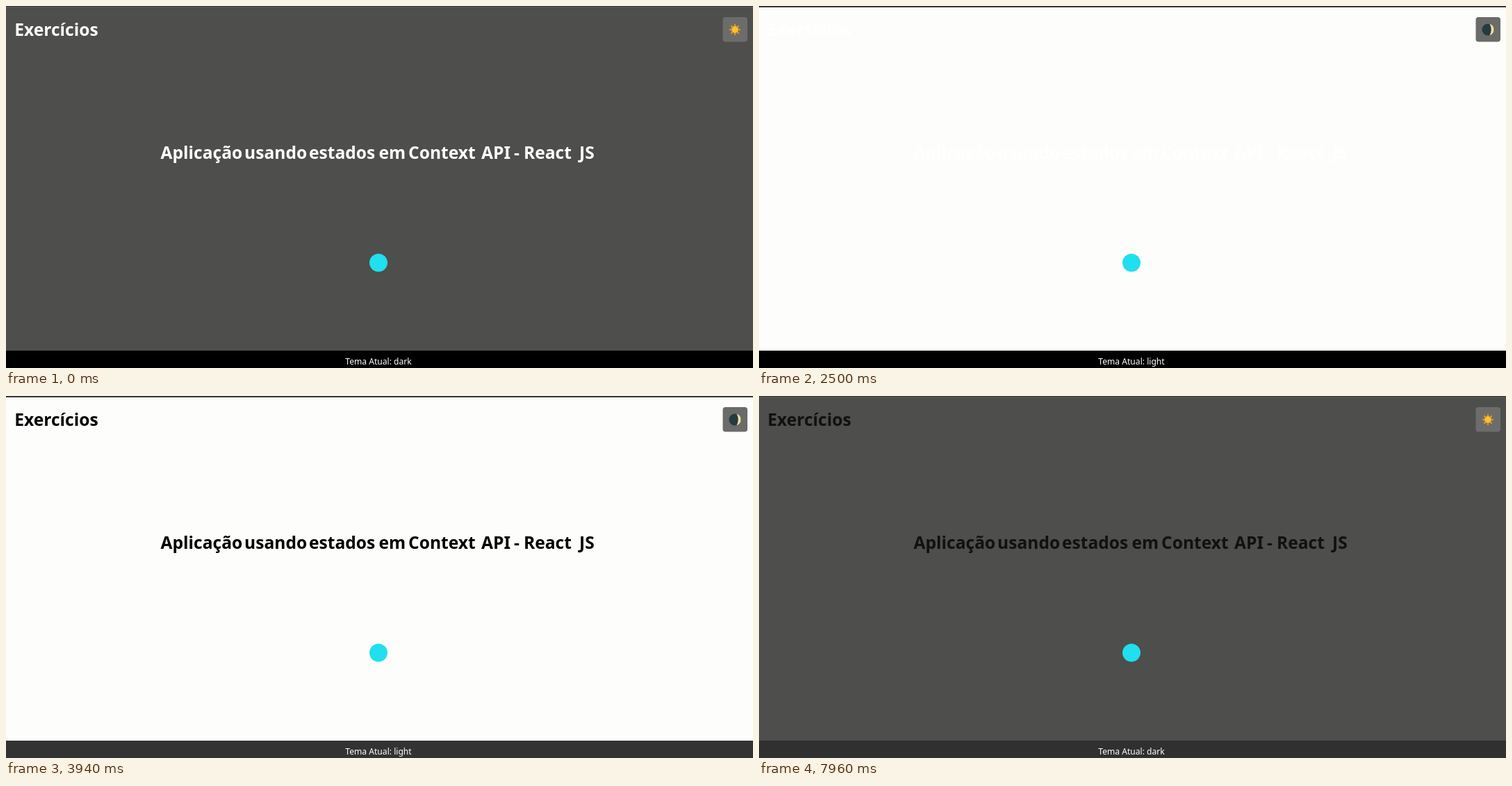
An HTML page for the animation above (8000 ms loop, 1075 by 521 pixels).

```html
<!DOCTYPE html>
<html lang="pt-BR">
<head>
<meta charset="utf-8">
<title>Exercícios</title>
<style>
  html, body { margin: 0; width: 100%; height: 100%; overflow: hidden; }
  svg { display: block; width: 100%; height: 100%; }
  text { font-family: "Noto Sans", "Open Sans", sans-serif; }
  .title { font-size: 24.6px; font-weight: 700; }
  .status { font-size: 12.1px; fill: #fff; text-anchor: middle; }
</style>
</head>
<body>
<svg viewBox="0 0 1075 521">
  <rect id="page" width="1075" height="521"/>
  <rect id="edge" width="1075" height="1"/>
  <rect id="edgeLow" y="1" width="1075" height="1"/>

  <g id="titles" class="title">
    <text x="12.2" y="42.5">Exercícios</text>
    <text id="heading" y="220"></text>
  </g>

  <rect id="button" x="1031.5" y="16" width="35.5" height="35.5" rx="4"/>
  <g id="sun" transform="translate(1049 34)">
    <g id="rays" fill="#f29a1f"></g>
    <circle r="4.9" fill="#fcc125"/>
  </g>
  <g id="moon" transform="translate(1049 34)">
    <circle r="8.6" fill="#263a42"/>
    <path d="M2.5-8.2A8.6 8.6 0 0 1 2.5 8.2Q7 0 2.5-8.2Z" fill="#f5dfa3"/>
  </g>

  <circle cx="536" cy="369.5" r="13" fill="#20dfee"/>

  <rect id="footer" y="496" width="1075" height="25"/>
  <text id="status" class="status" x="536" y="516"></text>
</svg>
<script>
const LOOP = 8000, FADE = 1500;
const TO_LIGHT = 2500, TO_DARK = 7720, DARK_FADE = 7840;
const BAR = 51; // footer grey in the light theme

const HEADING = "Aplicação usando estados em Context API - React JS";
const WORD_X = [222.5, 343, 436, 536.5, 579, 684, 731, 745, 825];

const themes = {
  dark:  { page: "#4e4e4c", edge: "#2c2c2c", edgeLow: "#5f5f5f", button: "#6c6c6b" },
  light: { page: "#fdfdfc", edge: "#333333", edgeLow: "#3c3c3c", button: "#6b6b69" }
};

const el = id => document.getElementById(id);
const grey = v => `rgb(${v},${v},${v})`;
const clamp = v => Math.min(1, Math.max(0, v));

// cubic-bezier(.25, .1, .25, 1)
function ease(x) {
  let lo = 0, hi = 1;
  for (let i = 0; i < 20; i++) {
    const t = (lo + hi) / 2;
    const bx = 0.75 * t * (1 - t) + t ** 3;
    if (bx < x) lo = t; else hi = t;
  }
  const t = (lo + hi) / 2, u = 1 - t;
  return 0.3 * u * u * t + 3 * u * t * t + t ** 3;
}

const fade = (time, start) => {
  const x = clamp((time - start) / FADE);
  return x === 0 || x === 1 ? x : ease(x);
};

function drawHeading() {
  el("heading").innerHTML = HEADING.split(" ")
    .map((word, i) => `<tspan x="${WORD_X[i]}">${word}</tspan>`).join(" ");
}

function drawRays() {
  let rays = "";
  for (let a = 0; a < 360; a += 45)
    rays += `<path d="M-1.7-5.5L0-8.7 1.7-5.5Z" transform="rotate(${a})"/>`;
  el("rays").innerHTML = rays;
}

function render(time) {
  const name = time >= TO_LIGHT && time < TO_DARK ? "light" : "dark";
  const light = fade(time, TO_LIGHT) - fade(time, DARK_FADE);

  for (const [id, color] of Object.entries(themes[name]))
    el(id).setAttribute("fill", color);
  el("titles").setAttribute("fill", grey(Math.round(255 * (1 - light))));
  el("footer").setAttribute("fill", grey(Math.round(BAR * light)));
  el("sun").style.display = name === "dark" ? "" : "none";
  el("moon").style.display = name === "light" ? "" : "none";
  el("status").textContent = "Tema Atual: " + name;
}

const start = performance.now();
function tick() {
  render((performance.now() - start) % LOOP);
  requestAnimationFrame(tick);
}

drawHeading();
drawRays();
tick();
</script>
</body>
</html>
```
